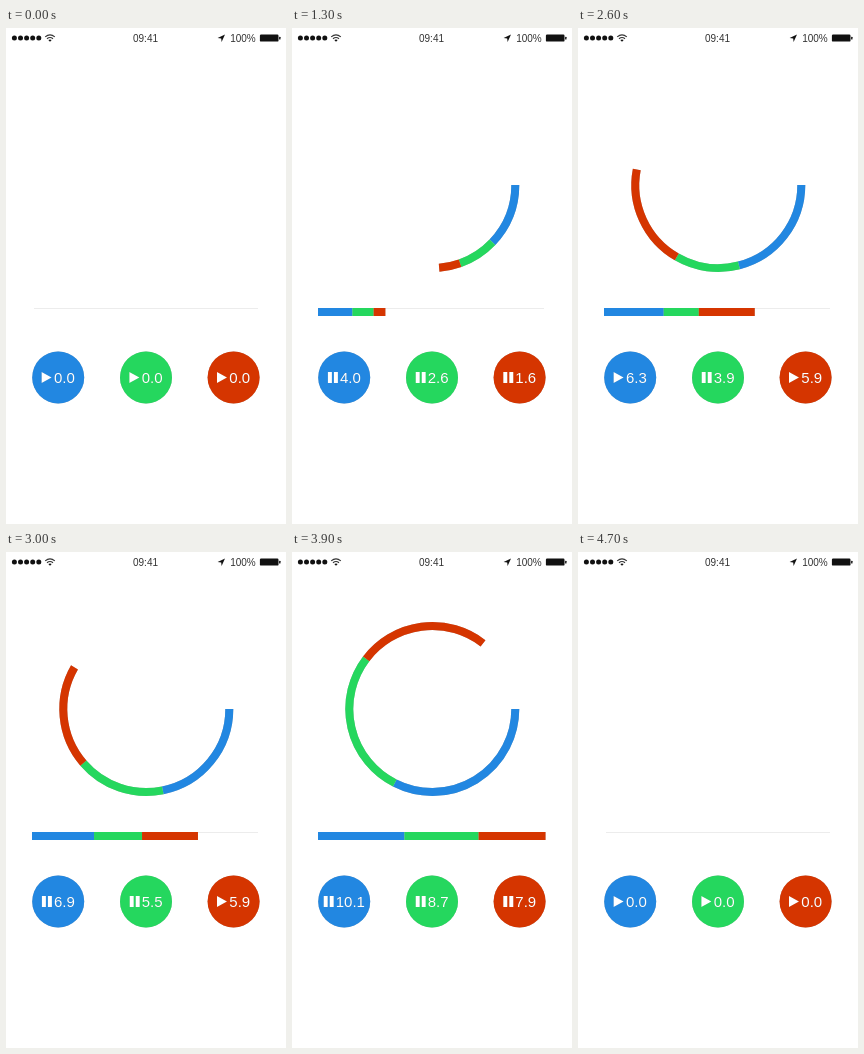
Write an HTML page that moves like this. It is 280 px wide and 496 px high and loops after 4800 ms.

```html
<!DOCTYPE html>
<html lang="en">
<head>
<meta charset="utf-8">
<title>Three timers</title>
<style>
html, body { margin: 0; width: 100%; height: 100%; overflow: hidden; background: #fff; }
svg { display: block; width: 280px; height: 496px; }
text { font-family: "Liberation Sans", Arial, sans-serif; }
.status text { font-size: 10px; fill: #333; }
.value { font-size: 15px; fill: #fff; }
.icon { fill: #fff; }
.arc { fill: none; stroke-width: 8; }
.soft { filter: drop-shadow(0 .5px .6px rgba(0, 0, 0, .28)); }
</style>
</head>
<body>
<svg id="stage" viewBox="0 0 280 496">
  <g class="status" fill="#111">
    <g id="dots"></g>
    <g fill="none" stroke="#333" stroke-width="1.2">
      <path d="M39.2 8.9Q44 4.7 48.8 8.9M41 10.8Q44 8.2 47 10.8"/>
    </g>
    <path d="M42.3 12Q44 10.8 45.7 12L44 13.8Z"/>
    <text x="139.5" y="13.6" text-anchor="middle">09:41</text>
    <path d="M219 6.5L215.6 14L215.2 10.4L211.6 10Z"/>
    <text x="224.2" y="13.6">100%</text>
    <rect x="253.9" y="6.6" width="18.6" height="7" rx="1.2"/>
    <rect x="273.1" y="8.7" width="1.4" height="2.8" rx=".6"/>
  </g>
  <rect x="28" y="280" width="224" height="1" fill="#ececec"/>
  <g id="ring" class="soft"></g>
  <g id="bar" class="soft"></g>
  <g id="buttons"></g>
</svg>
<script>
const LOOP = 4800, STEP = 100, RESET = 4500;
const RING = { x: 140.3, y: 157, r: 83, max: 30 };
const BAR = { x: 26, y: 280, w: 227.5, h: 8, max: 24 };
const PLAY = "M0 0L10 5.5L0 11Z";
const PAUSE = "M.3 0h4v11h-4zM6.3 0h4v11h-4z";

// keys: [time in ms, counter value]; a timer runs while its value rises
const timers = [
  { x: 52.2, color: "#2287e1", keys: [[240, 0], [1300, 4.01], [1900, 6.2], [1930, 6.3], [2830, 6.3], [3400, 8.3], [3900, 10.1], [4500, 12.3]] },
  { x: 140, color: "#25d75e", keys: [[580, 0], [1300, 2.6], [1600, 3.7], [2545, 3.7], [2600, 3.9], [3400, 7], [3900, 8.7], [4500, 10.9]] },
  { x: 227.6, color: "#d53500", keys: [[860, 0], [1300, 1.6], [1900, 3.7], [2300, 5.6], [2400, 5.88], [2450, 5.9], [3345, 5.9], [3400, 6.1], [3900, 7.9], [4500, 10.1]] }
];

function add(parent, tag, attrs) {
  const el = document.createElementNS("http://www.w3.org/2000/svg", tag);
  for (const k in attrs) el.setAttribute(k, attrs[k]);
  return parent.appendChild(el);
}

const byId = id => document.getElementById(id);

for (let i = 0; i < 5; i++) add(byId("dots"), "circle", { cx: 8.4 + i * 6.1, cy: 10, r: 2.5 });

for (const timer of timers) {
  const { x, color } = timer;
  timer.arc = add(byId("ring"), "path", { class: "arc", stroke: color });
  timer.block = add(byId("bar"), "rect", { y: BAR.y, height: BAR.h, fill: color });
  const button = add(byId("buttons"), "g", { transform: `translate(${x} 349.4)` });
  add(button, "circle", { r: 26, fill: color, class: "soft" });
  timer.label = add(button, "g", { class: "soft" });
  timer.icon = add(timer.label, "path", { class: "icon", transform: "translate(-16.6 -5.4)" });
  timer.text = add(timer.label, "text", { class: "value", x: -4.3, y: 5.6 });
}

function stateAt(keys, t) {
  if (t < keys[0][0] || t >= RESET) return { value: 0, running: false };
  const i = keys.findIndex(k => k[0] > t);
  const [t0, v0] = keys[i - 1], [t1, v1] = keys[i];
  return { value: v0 + (v1 - v0) * (t - t0) / (t1 - t0), running: v1 > v0 };
}

function arcPath(from, to) {
  const point = turn => {
    const a = turn * 2 * Math.PI;
    return `${RING.x + RING.r * Math.cos(a)} ${RING.y + RING.r * Math.sin(a)}`;
  };
  return `M${point(from)}A${RING.r} ${RING.r} 0 ${to - from > .5 ? 1 : 0} 1 ${point(to)}`;
}

function draw(t) {
  // ring and bar trail the counters by one step
  const shown = timers.map(({ keys }) => t >= RESET ? 0 : stateAt(keys, t - STEP).value);
  const total = shown.reduce((a, b) => a + b, 0);
  const ringMax = Math.max(RING.max, total);
  const barMax = Math.max(BAR.max, total);
  let sum = 0;
  timers.forEach((timer, i) => {
    const { value, running } = stateAt(timer.keys, t);
    const digits = value.toFixed(1);
    timer.text.textContent = digits;
    timer.icon.setAttribute("d", running ? PAUSE : PLAY);
    timer.label.setAttribute("transform", `translate(${digits.length > 3 ? -4.2 : 0} 0)`);
    const next = sum + shown[i];
    timer.arc.setAttribute("d", next > sum ? arcPath(sum / ringMax, next / ringMax) : "");
    timer.block.setAttribute("x", BAR.x + BAR.w * sum / barMax);
    timer.block.setAttribute("width", BAR.w * shown[i] / barMax);
    sum = next;
  });
}

const start = performance.now();
function frame() {
  const t = (performance.now() - start) % LOOP;
  draw(Math.floor(t / STEP) * STEP);
  requestAnimationFrame(frame);
}
frame();
</script>
</body>
</html>
```
